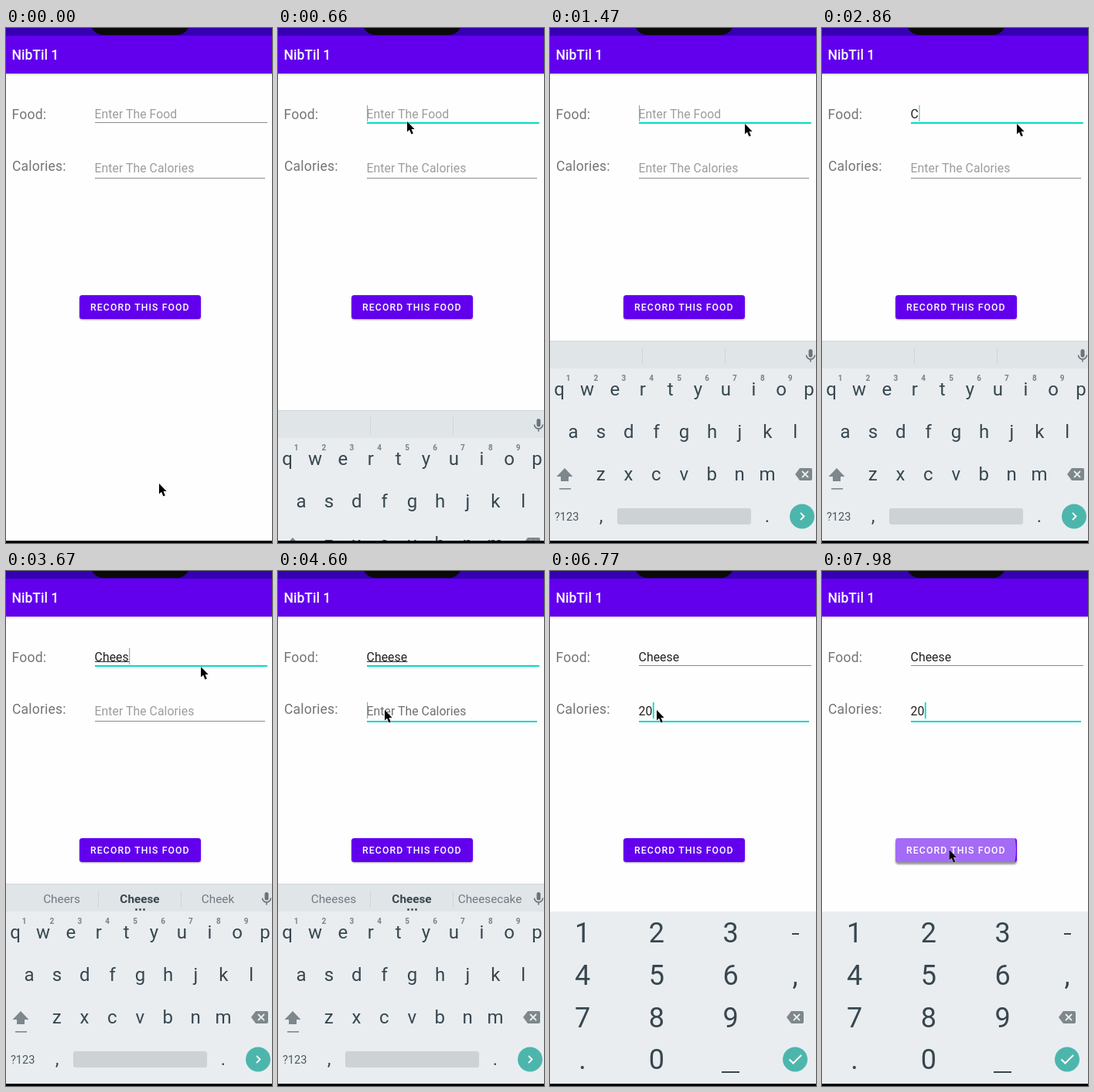
Write an HTML page that moves like this. It is 344 px wide and 667 px high and loops after 8 s.

```html
<!DOCTYPE html>
<html lang="en">
<head>
<meta charset="utf-8">
<title>Food log</title>
<style>
html, body { margin: 0; width: 100%; height: 100%; overflow: hidden; background: #fefefe; }
svg { display: block; width: 344px; height: 667px; font-family: Roboto, sans-serif; }
.label { font-size: 17.5px; fill: #757575; letter-spacing: .2px; }
.field { font-size: 15.77px; letter-spacing: .05px; fill: #222; }
.key { font-size: 24px; fill: #37474f; text-anchor: middle; }
.num { font-size: 36px; fill: #37474f; text-anchor: middle; }
.mini { font-size: 10px; font-weight: 700; fill: #78838a; text-anchor: middle; }
.tip { font-size: 15.3px; fill: #6f7a80; text-anchor: middle; }
.bold { font-weight: 700; fill: #37474f; }
</style>
</head>
<body>
<svg viewBox="0 0 344 667">
  <defs>
    <clipPath id="buttonClip"><rect x="95" y="346" width="157" height="31" rx="3.5"/></clipPath>
    <filter id="blur" x="-10%" y="-40%" width="120%" height="180%"><feGaussianBlur stdDeviation="1.3"/></filter>
    <linearGradient id="edge" x2="0" y2="1"><stop stop-color="#000" stop-opacity=".16"/><stop offset="1" stop-opacity="0"/></linearGradient>
    <g id="erase">
      <path d="M-11 0L-5 -8H9Q11 -8 11 -6V6Q11 8 9 8H-5Z" fill="#7d878c"/>
      <path d="M-2 -4L6 4M6 -4L-2 4" stroke="#e9edf0" stroke-width="1.8"/>
    </g>
  </defs>
  <rect width="344" height="667" fill="#fefefe"/>
  <rect y="59" width="344" height="3" fill="url(#edge)"/>
  <rect width="344" height="59" fill="#6200ee"/>
  <rect width="344" height="10" fill="#3700b3"/>
  <path d="M111 0Q116 9 127 9H220Q231 9 236 0Z" fill="#0a0a0a"/>
  <text x="7.6" y="41" font-size="17.5" font-weight="500" fill="#fff">NibTil 1</text>
  <text class="label" x="7.6" y="118">Food:</text>
  <text class="label" x="8" y="185">Calories:</text>

  <rect id="foodLine" x="115" y="122" width="223"/>
  <rect id="calLine" x="115" y="194" width="220"/>
  <text id="food" class="field" x="114.6" y="116.5"></text>
  <text id="cal" class="field" x="114.6" y="186.6"></text>
  <rect id="compose" x="115" y="117" height="1" fill="#333"/>
  <rect id="caret" height="21"/>

  <rect id="shadow" x="95" width="157" height="31" rx="4" filter="url(#blur)"/>
  <rect x="95" y="346" width="157" height="31" rx="3.5" fill="#6200ee"/>
  <g clip-path="url(#buttonClip)"><circle id="ripple" cy="361" fill="#fff" opacity=".42"/></g>
  <text x="109.1" y="366.4" font-size="12.26" font-weight="500" letter-spacing="1.095" fill="#fff">RECORD THIS FOOD</text>

  <g id="letters">
    <rect y="405" width="344" height="262" fill="#e9edf0"/>
    <rect y="405" width="344" height="36" fill="#e0e5e8"/>
    <path d="M0 405.5H344M119.5 414V435.5M226.5 414V435.5" stroke="#d0d5d8"/>
    <g id="tips">
      <text class="tip" x="72" y="430"></text>
      <text class="tip bold" x="173" y="430"></text>
      <text class="tip" x="274" y="430"></text>
      <path d="M168.5 438.5h0M173.5 438.5h0M178.5 438.5h0" stroke="#37474f" stroke-width="2.8" stroke-linecap="round"/>
    </g>
    <rect x="334.5" y="416" width="5" height="10.5" rx="2.5" fill="#69757b"/>
    <path d="M331.5 423.5A5.5 5.5 0 0 0 342.5 423.5M337 429V432.5" fill="none" stroke="#69757b" stroke-width="1.6"/>
    <g fill="#7d878c">
      <path d="M19 570L29.5 581H24V587H14V581H8.5Z"/>
      <rect x="12" y="596" width="15" height="1.6"/>
    </g>
    <use href="#erase" x="328" y="578"/>
    <text x="6" y="637.5" font-size="14.5" fill="#4a585f">?123</text>
    <rect x="87" y="622" width="173" height="21" rx="3" fill="#cdd2d5"/>
    <circle cx="326" cy="632.5" r="16" fill="#4db6ac"/>
    <path d="M324 628L328.5 632.5L324 637" fill="none" stroke="#fff" stroke-width="1.8"/>
  </g>
  <g id="digits">
    <rect y="441" width="344" height="226" fill="#e9edf0"/>
    <path d="M313 470H322M222 649H245" stroke="#37474f" stroke-width="2"/>
    <use href="#erase" x="317" y="578"/>
    <circle cx="317" cy="632.5" r="16" fill="#4db6ac"/>
    <path d="M309.5 632.5L314.5 637.5L325 627" fill="none" stroke="#fff" stroke-width="2"/>
  </g>
  <rect y="664" width="344" height="3"/>
  <path id="pointer" d="M0 0V13.6L3.1 10.8L5.4 16.4L7.8 15.4L5.5 10H9.6Z" stroke="#fff" stroke-width=".8" paint-order="stroke"/>
</svg>
<script>
const $ = id => document.getElementById(id);
const set = (id, attrs) => { for (const k in attrs) $(id).setAttribute(k, attrs[k]); };
const show = (id, on) => { $(id).style.display = on ? '' : 'none'; };

function addText(parent, cls, x, y, str) {
  const el = document.createElementNS('http://www.w3.org/2000/svg', 'text');
  el.setAttribute('class', cls);
  el.setAttribute('x', x);
  el.setAttribute('y', y);
  el.textContent = str;
  $(parent).append(el);
}
const keyRow = (str, x, y, cls = 'key') =>
  [...str].forEach((c, i) => addText('letters', cls, x + i * 35.9, y, c));
keyRow('qwertyuiop', 12, 476);
keyRow('123456789', 23.5, 457, 'mini');
keyRow('asdfghjkl', 30, 531);
keyRow('zxcvbnm', 65.6, 586);
addText('letters', 'key', 66, 640, ',');
addText('letters', 'key', 281, 640, '.');
['123', '456', '789', '.0'].forEach((row, r) =>
  [...row].forEach((c, i) => addText('digits', 'num', 42 + i * 95.8, 481 + r * 54.8, c)));
addText('digits', 'num', 317, 536, ',');

// Timelines: [time, value...]
const pointer = [[0, 198, 590], [120, 194.5, 199], [270, 181, 160], [390, 169, 130], [510, 167, 121],
  [810, 167, 124], [960, 182, 124], [1080, 203, 124], [1200, 221, 124], [1350, 240, 124], [1470, 252, 124],
  [4090, 226, 170], [4210, 178, 225], [4330, 148, 200], [4450, 138, 180],
  [7320, 130, 230], [7440, 121, 300], [7560, 136, 354], [7680, 156, 374], [7830, 164.5, 361]];
const caret = [[0, 0], [510, 1], [1080, 0], [1470, 1], [2060, 0], [2490, 1], [4330, 0], [4600, 1],
  [5160, 0], [5690, 1], [6220, 0], [6620, 1], [7320, 0], [7830, 1]];
const food = [[0, ''], [2860, 'C'], [3010, 'Ch'], [3250, 'Che'], [3520, 'Chee'], [3670, 'Chees'], [3820, 'Cheese']];
const cal = [[0, ''], [6620, '2'], [6770, '20']];
const tips = [[0], [3130, 'Ch', 'Change', 'Children'], [3370, 'Che', 'Check', 'Chemical'],
  [3520, 'Cheers', 'Cheese', 'Cheek'], [3940, 'Cheeses', 'Cheese', 'Cheesecake']];
const at = (list, t) => list.findLast(e => e[0] <= t).slice(1);

function field(id, value, hint, dark) {
  $(id).textContent = value || hint;
  $(id).style.fill = value ? '#222' : dark ? '#707070' : '#9d9d9d';
}
const underline = (id, on) => set(id, { height: on ? 2 : 1, fill: on ? '#03dac5' : '#8c8c8c' });

function draw(t) {
  const [name] = at(food, t), [amount] = at(cal, t), [x, y] = at(pointer, t);
  const onCal = t >= 4600;
  set('pointer', { transform: `translate(${x} ${y})` });

  field('food', name, 'Enter The Food', t >= 510 && t < 660);
  field('cal', amount, 'Enter The Calories', onCal && t < 4730);
  underline('foodLine', t >= 510 && t < 4730);
  underline('calLine', onCal);

  const width = $('food').getComputedTextLength();
  show('compose', t >= 3010 && t < 4730);
  set('compose', { width });
  const end = onCal ? (amount ? $('cal').getComputedTextLength() : 0) : (name ? width : 0);
  show('caret', at(caret, t)[0]);
  set('caret', { x: 115 + end, y: onCal ? 170 : 100, width: amount ? 1.8 : 1.2,
    fill: amount ? '#03dac5' : '#7fb3af' });

  const words = at(tips, t);
  show('tips', words.length);
  words.forEach((w, i) => { $('tips').children[i].textContent = w; });
  show('letters', t >= 660 && t < 4730);
  set('letters', { transform: `translate(0 ${t < 810 ? 90 : 0})` });
  show('digits', t >= 4730);

  const pressed = t >= 7980;
  set('ripple', { cx: pressed ? 161 : 159, r: pressed ? 90 : t >= 7830 ? 46 : 0 });
  set('shadow', { y: pressed ? 349 : 347, opacity: pressed ? .4 : .3 });
}

const start = performance.now();
function loop() {
  draw((performance.now() - start) % 8000);
  requestAnimationFrame(loop);
}
loop();
</script>
</body>
</html>
```
